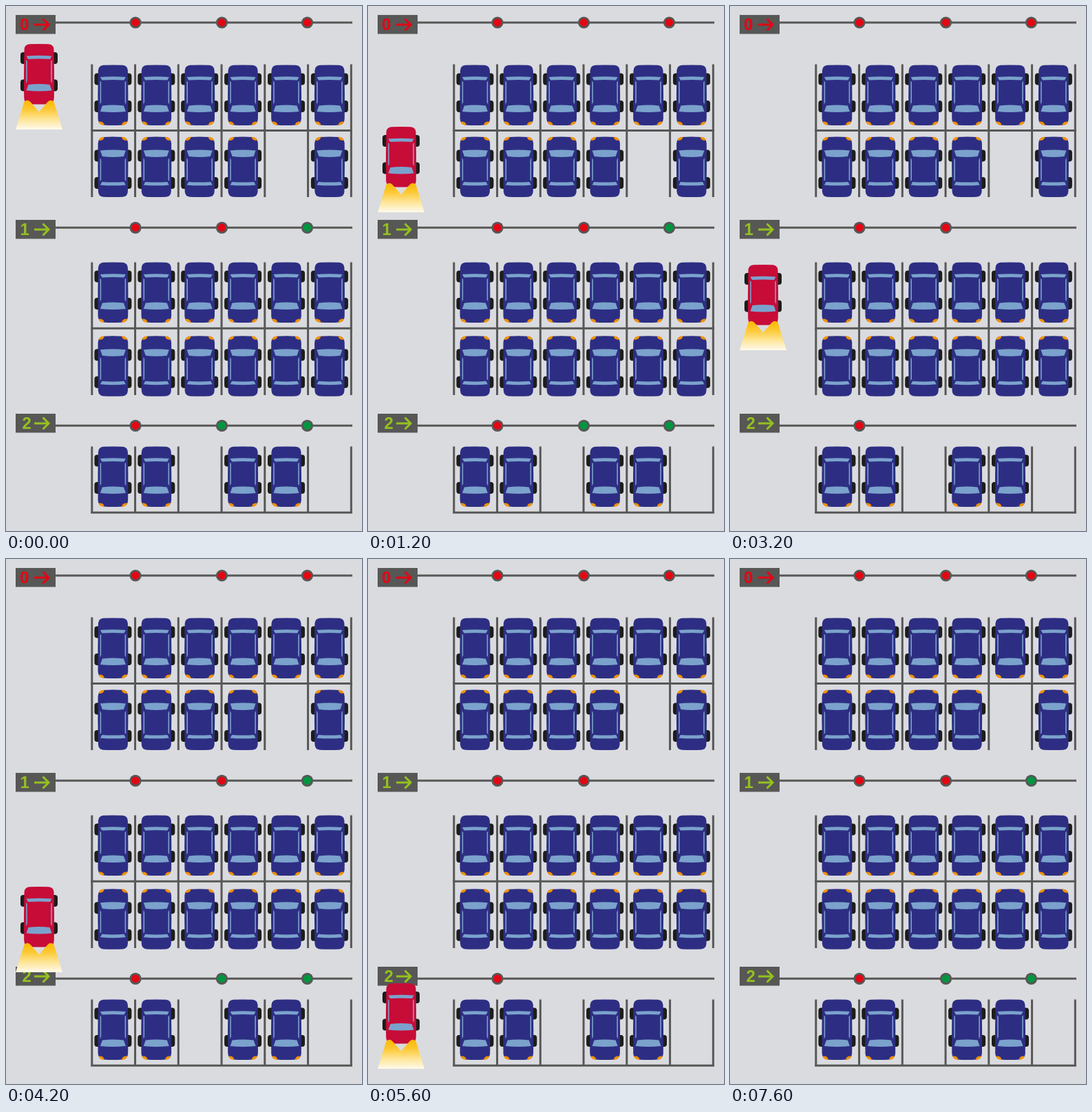
Write an HTML page that moves like this. It is 517 px wide and 761 px high and loops after 7800 ms.

```html
<!DOCTYPE html>
<html lang="en">
<head>
<meta charset="utf-8">
<title>Parking guidance</title>
<style>
html, body { margin: 0; width: 100%; height: 100%; overflow: hidden; background: #dadbdf; }
svg { display: block; width: 517px; height: 761px; }
text { font: bold 24px "Liberation Sans", Arial, sans-serif; }
</style>
</head>
<body>
<svg viewBox="0 0 517 761">
  <defs>
    <linearGradient id="glow" gradientUnits="userSpaceOnUse" x1="0" y1="82" x2="0" y2="124">
      <stop offset="0" stop-color="#fbb800"/>
      <stop offset=".3" stop-color="#fdc831"/>
      <stop offset=".65" stop-color="#fee596"/>
      <stop offset="1" stop-color="#fffaec"/>
    </linearGradient>
    <!-- Car facing down, centred on x = 0, roof line from y = 0 to 87.5 -->
    <g id="wheels" fill="#1d1d1b">
      <rect x="-27" y="12" width="54" height="17" rx="4"/>
      <rect x="-27" y="51.5" width="54" height="17" rx="4"/>
    </g>
    <path id="body" d="M-14 .3Q0 -.4 14 .3Q21 .8 21.5 8L22 44L21.8 78Q21.500 86 14 87Q0 88 -14 87Q-21.500 86 -21.800 78L-22 44L-21.500 8Q-21 .8 -14 .3Z"/>
    <g id="glass" fill="#7ba2cc">
      <path d="M-18.500 17.500Q0 15.800 18.500 17.500L16 22Q0 20.800 -16 22Z"/>
      <path d="M-15.500 59Q0 57 15.500 59L18.500 67.500Q0 69.500 -18.500 67.500Z"/>
      <path d="M-18.800 23L-17.200 25V54L-18.800 57Z"/>
      <path d="M18.800 23L17.200 25V54L18.800 57Z"/>
    </g>
    <g id="parked">
      <use href="#wheels"/>
      <use href="#body" fill="#2d2e83"/>
      <use href="#glass"/>
      <path id="lamp" fill="#f39200" d="M-21 82Q-13.500 81.500 -12.500 87.200Q-19 87.500 -21 82Z"/>
      <use href="#lamp" transform="scale(-1 1)"/>
    </g>
    <path id="beam" fill="url(#glow)" d="M-21.500 84Q-17 79.500 -12.500 84L0 98.500L18 124H-34Z"/>
  </defs>
  <g id="scene"></g>
  <g id="mover">
    <use href="#wheels"/>
    <use href="#body" fill="#c70c38"/>
    <use href="#glass"/>
    <use href="#beam"/>
    <use href="#beam" transform="scale(-1 1)"/>
  </g>
</svg>
<script>
const GREY = "#575756", RED = "#e30613", GREEN = "#009640", LIME = "#95c11f";
const scene = document.getElementById("scene");
const mover = document.getElementById("mover");
const bayX = i => 124.8 + i * 62.75;
const parts = [];

const line = (x1, y1, x2, y2) =>
  parts.push(`<path d="M${x1} ${y1}L${x2} ${y2}" stroke="${GREY}" stroke-width="3"/>`);

function level(name, textX, boxY, lineY, colour, dots) {
  const mid = boxY + 14;
  line(72, lineY, 503, lineY);
  parts.push(`<rect x="14" y="${boxY}" width="58" height="27.500" fill="${GREY}"/>
    <text x="${textX}" y="${boxY + 22}" fill="${colour}">${name}</text>
    <path d="M41 ${mid}H61M53.500 ${mid - 8.5}L62 ${mid}L53.500 ${mid + 8.5}"
      fill="none" stroke="${colour}" stroke-width="3"/>`);
  dots.forEach((c, i) => parts.push(
    `<g ${c === GREEN ? 'class="free"' : ""}>
      <circle cx="${[188, 313.5, 437.5][i]}" cy="${lineY}" r="8.600" fill="${GREY}"/>
      <circle cx="${[188, 313.5, 437.5][i]}" cy="${lineY}" r="5.700" fill="${c}"/></g>`));
}

function bays(top, bottom, wallY) {
  for (let i = 0; i < 7; i++) line(bayX(i), top, bayX(i), bottom);
  line(123.3, wallY, 502.9, wallY);
}

// Pattern: x = taken, . = empty
function cars(pattern, y, flip) {
  [...pattern].forEach((c, i) => {
    if (c !== "x") return;
    const place = `translate(${155.4 + i * 62.9} ${flip ? y + 87.5 : y})`;
    parts.push(`<use href="#parked" transform="${place}${flip ? " scale(1 -1)" : ""}"/>`);
  });
}

level("0", 20, 13, 24, RED, [RED, RED, RED]);
level("1", 20.5, 310, 321.3, LIME, [RED, RED, GREEN]);
level("2", 23.5, 591, 608.3, LIME, [RED, GREEN, GREEN]);
bays(84.5, 277, 180.5);
bays(371.5, 564, 467.3);
bays(638.5, 735, 734.3);
cars("xxxxxx", 85.5, false);
cars("xxxx.x", 189.5, true);
cars("xxxxxx", 371.5, false);
cars("xxxxxx", 478.3, true);
cars("xx.xx.", 638.5, false);
scene.innerHTML = parts.join("");

const free = scene.querySelectorAll(".free");
const STEP = 200, STEPS = 39;

// 20 px per step, with a short slow stretch past the last sign
function carY(n) {
  const slow = Math.min(Math.max(n - 29, 0), 3);
  return 55 + n * 20 - slow * 10;
}

function draw(time) {
  const n = Math.floor(time / STEP) % STEPS;
  mover.setAttribute("transform", `translate(48 ${carY(n)})`);
  free.forEach(dot => dot.setAttribute("visibility", n % 3 === 1 ? "hidden" : "visible"));
}

const start = performance.now();
function tick() {
  draw(performance.now() - start);
  requestAnimationFrame(tick);
}
tick();
</script>
</body>
</html>
```
